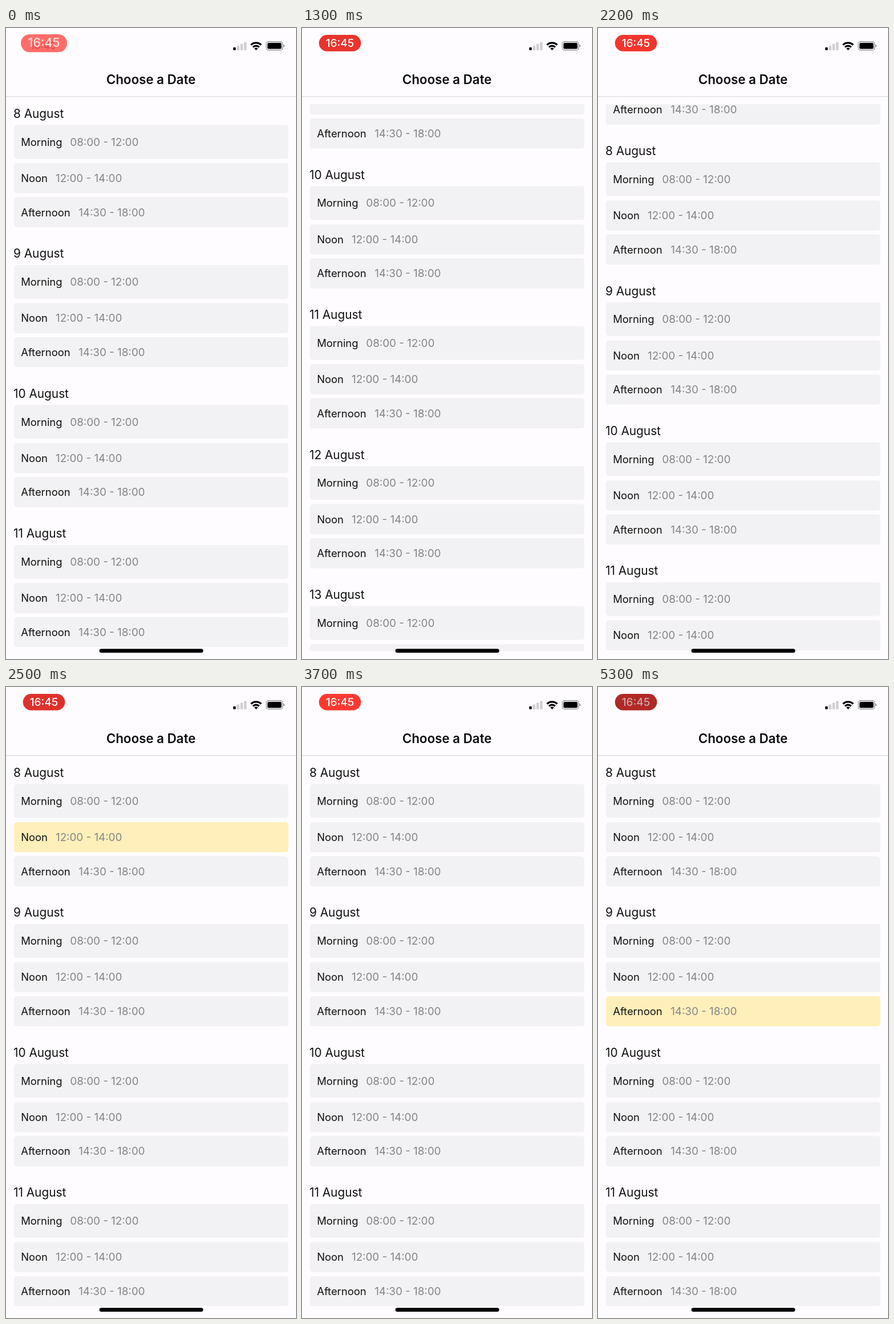
Write an HTML page that moves like this. It is 508 by 1102 pixels and loops after 5400 ms.

```html
<!DOCTYPE html>
<html lang="en">
<head>
<meta charset="utf-8">
<title>Choose a Date</title>
<style>
  html, body { margin: 0; width: 100%; height: 100%; overflow: hidden; background: #fefcff; }
  svg { display: block; font-family: Inter, sans-serif; }
  .day { font-size: 20.8px; fill: #111; }
  .label { font-size: 18.4px; fill: #111; }
  .hours { font-size: 18.8px; fill: #858488; }
  .row { fill: #f2f1f3; }
  .row.on { fill: #ffefba; }
</style>
</head>
<body>
<svg width="508" height="1102" viewBox="0 0 508 1102">
  <defs><clipPath id="window"><rect y="133" width="508" height="955"/></clipPath></defs>

  <g clip-path="url(#window)"><g id="list"></g></g>

  <text x="254" y="98" font-size="22.3" font-weight="600" text-anchor="middle" fill="#0b0b0d">Choose a Date</text>
  <rect y="119" width="508" height="1.4" fill="#dddce0"/>

  <!-- recording pill -->
  <rect id="pill"/>
  <text id="ghost" x="65" y="37" font-size="17" font-weight="600" text-anchor="middle" fill="#c9413d" opacity=".6">16:45</text>
  <text id="clock" x="66.5" y="33.3" font-weight="500" text-anchor="middle">16:45</text>

  <!-- signal, wifi, battery -->
  <g id="signal"></g>
  <g fill="none" stroke="#000" stroke-width="3.2">
    <path d="M429.2 29.6a12.6 12.6 0 0 1 17.8 0"/>
    <path d="M432.6 33.4a7.8 7.8 0 0 1 11 0"/>
  </g>
  <path d="M438.1 39l-3.2-3.3a4.6 4.6 0 0 1 6.4 0z"/>
  <rect x="456" y="24" width="28.6" height="14.6" rx="4" fill="none" stroke="#8f8e92" stroke-width="1.3"/>
  <rect x="458" y="26" width="24.6" height="10.6" rx="2.3"/>
  <path d="M486 28.7q2 .8 2 2.5t-2 2.5z" fill="#8f8e92"/>

  <rect x="163.5" y="1084.2" width="182" height="6.8" rx="3.4"/>
</svg>
<script>
const LOOP = 5400, STEP = 100, DAY_HEIGHT = 244.4;
const byId = id => document.getElementById(id);

function add(parent, tag, attrs, text = '') {
  const node = document.createElementNS('http://www.w3.org/2000/svg', tag);
  set(node, attrs);
  node.textContent = text;
  return parent.appendChild(node);
}
function set(node, attrs) {
  for (const name in attrs) node.setAttribute(name, attrs[name]);
}

const slots = [
  { label: 'Morning', hours: '08:00 - 12:00', hoursX: 112.3, top: 169.5, height: 59 },
  { label: 'Noon', hours: '12:00 - 14:00', hoursX: 87, top: 236, height: 52.6 },
  { label: 'Afternoon', hours: '14:30 - 18:00', hoursX: 127.2, top: 295.5, height: 52.6 }
];
const rows = {};
for (let date = 7; date <= 14; date++) {
  const day = add(byId('list'), 'g', { transform: `translate(0 ${(date - 8) * DAY_HEIGHT})` });
  add(day, 'text', { class: 'day', x: 13, y: 157 }, `${date} August`);
  for (const { label, hours, hoursX, top, height } of slots) {
    const y = top + height / 2 + 6.8;
    rows[date + label] = add(day, 'rect', { class: 'row', x: 14, y: top, width: 480.5, height, rx: 5 });
    add(day, 'text', { class: 'label', x: 26.2, y }, label);
    add(day, 'text', { class: 'hours', x: hoursX, y }, hours);
  }
}
for (let i = 0; i < 4; i++) {
  const height = 5 + 3.1 * i;
  add(byId('signal'), 'rect',
    { x: 398 + 6.3 * i, y: 38.7 - height, width: 4.5, height, rx: 1, fill: i ? '#cfced1' : '#000' });
}

const smooth = u => u * u * (3 - 2 * u);
const easeOut = u => 1 - (1 - u) ** 3;
const scrolls = [
  { start: 50, end: 950, to: 2 * DAY_HEIGHT, ease: easeOut },
  { start: 1098, end: 1900, to: -185, ease: smooth },
  { start: 1900, end: 2400, to: 0, ease: smooth },
  { start: 2500, end: 2700, to: -56, ease: smooth },
  { start: 2700, end: 3100, to: 0, ease: easeOut }
];
function scrollAt(t) {
  let y = 0;
  for (const { start, end, to, ease } of scrolls) {
    if (t > start) y += (to - y) * ease(Math.min(1, (t - start) / (end - start)));
  }
  return y;
}

function drawPill(t) {
  const appearing = t < 100, pressed = t >= 5300;
  const glow = (1 - Math.cos((t - 2800) / 1950 * 2 * Math.PI)) / 2;
  const pulse = `rgb(${214 + 41 * glow}, ${47 + 11 * glow}, ${42 + 6 * glow})`;
  set(byId('pill'), appearing
    ? { x: 26, y: 11, width: 81, height: 31.2, rx: 15.6, fill: '#ff6d69' }
    : { x: 29.7, y: 12, width: 73.6, height: 28.8, rx: 14.4, fill: pressed ? '#b22825' : pulse });
  set(byId('clock'), {
    'font-size': appearing ? 21.5 : 19,
    fill: appearing ? '#ffe1df' : pressed ? '#cda9a7' : '#fff'
  });
  byId('ghost').style.display = appearing ? '' : 'none';
}

function draw(now) {
  const t = Math.floor(now % LOOP / STEP) * STEP;
  set(byId('list'), { transform: `translate(0 ${-scrollAt(t)})` });
  rows['8Noon'].classList.toggle('on', t >= 2300 && t < 3300);
  rows['9Afternoon'].classList.toggle('on', t >= 3900);
  drawPill(t);
}

let origin;
function tick(now) {
  origin ??= now;
  draw(now - origin);
  requestAnimationFrame(tick);
}
draw(0);
requestAnimationFrame(tick);
</script>
</body>
</html>
```
